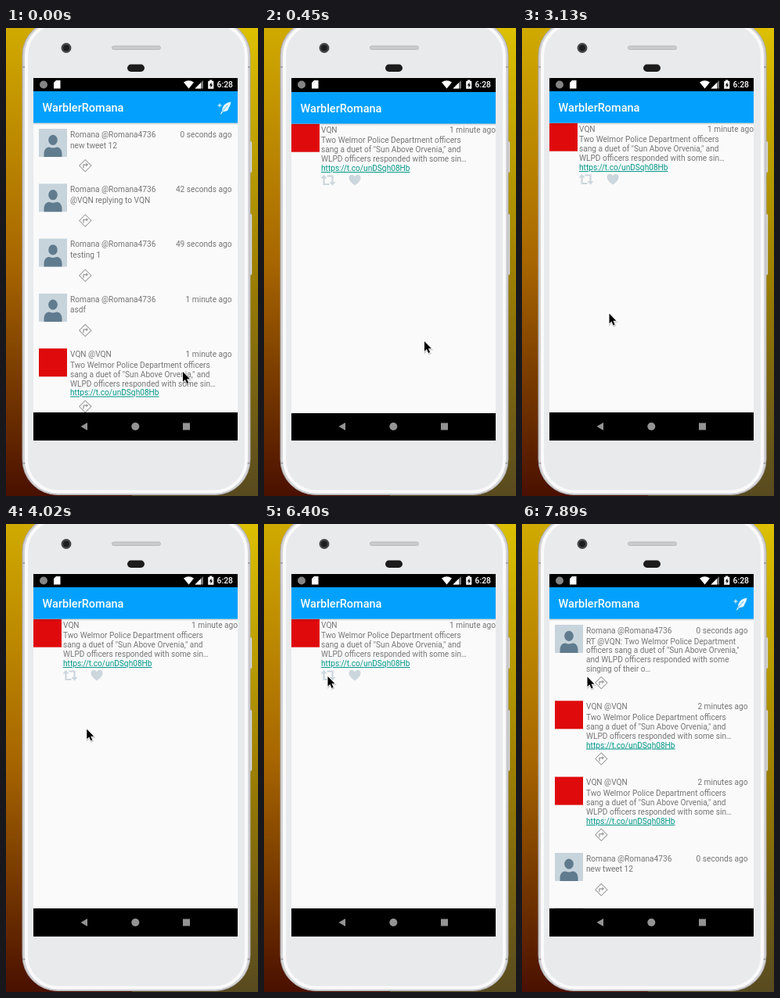
These frames come from a looping animation (322x599 px, 8000 ms). An HTML page:

```html
<!DOCTYPE html>
<html lang="en">
<head>
<meta charset="utf-8">
<title>Timeline demo</title>
<style>
  html, body { margin: 0; width: 100%; height: 100%; overflow: hidden; }
  body {
    background:
      linear-gradient(#dcc000, #a08200 50%, #584a20) right / 50% 100% no-repeat,
      linear-gradient(#d0aa00, #a86600 50%, #4a1000);
  }
  svg { display: block; width: 322px; height: 599px; }
  text { font: 10.15px Roboto, "Liberation Sans", sans-serif; fill: #757575; white-space: pre; }
  .title { font-size: 14.5px; font-weight: 500; fill: #fff; }
  .clock { font-size: 10.4px; font-weight: 500; fill: #fff; }
  .link { fill: #009688; text-decoration: underline; }
  .end { text-anchor: end; }
</style>
</head>
<body>
<svg viewBox="0 0 322 599">
  <defs>
    <clipPath id="screen"><rect x="35" y="64" width="261" height="464"/></clipPath>
    <linearGradient id="shade" x2="0" y2="1">
      <stop stop-opacity=".18"/>
      <stop offset="1" stop-opacity="0"/>
    </linearGradient>
    <g id="person">
      <rect width="36" height="36" fill="#c8d4dc"/>
      <ellipse cx="18" cy="14.3" rx="5.8" ry="6.6" fill="#607b8e"/>
      <path d="M6.5 36v-4c0-6 3.5-8.5 7-8.5q4.5 2 9 0c3.5 0 7 2.5 7 8.5v4z" fill="#607b8e"/>
    </g>
    <rect id="news" width="36" height="36" fill="#df0a0c"/>
    <g id="reply" fill="none" stroke="#9b9b9b" stroke-linejoin="round">
      <rect x="-5.4" y="-5.4" width="10.8" height="10.8" transform="rotate(45)"/>
      <path d="M-2.3 3V-1.2H1.5" stroke-width="1.3"/>
      <path d="M1-3.6 3.8-1.2 1 1.2z" fill="#9b9b9b" stroke="none"/>
    </g>
    <path id="arrow" d="M0 0V15L3.4 11.8 6 17.6 8.4 16.5 5.9 10.9H10.5z"/>
  </defs>

  <!-- phone body -->
  <g fill="#ececee" stroke="#b4b5b7" stroke-width=".6">
    <rect x="309" y="145" width="5" height="40" rx="1.5"/>
    <rect x="309" y="238" width="5" height="78" rx="1.5"/>
  </g>
  <rect x="21" y="-10" width="291" height="607.5" rx="45" fill="#d4d4d7" stroke="#aaa9ac"/>
  <path d="M21 50h5M307 50h5M21 557h5M307 557h5" stroke="#a4a4a7" stroke-width="2"/>
  <rect x="26" y="-6" width="281" height="599.5" rx="41" fill="#e9eaec" stroke="#fafafb" stroke-width="4"/>
  <circle cx="77" cy="25.5" r="6.5" fill="#47484a"/>
  <circle cx="77" cy="25.5" r="4" fill="#1d1e20"/>
  <rect x="135.5" y="23" width="62" height="4.5" rx="2.2" fill="#cbccce" stroke="#a9abad" stroke-width=".7"/>
  <rect x="155" y="46.5" width="22" height="9.5" rx="4.7" fill="#1c1c1d"/>

  <g clip-path="url(#screen)">
    <g id="before"></g>
    <g id="after"></g>
    <g id="detail"></g>
  </g>

  <!-- system icons -->
  <circle cx="48" cy="72.5" r="5" fill="#858585"/>
  <path d="M64 67h5.5v10.5h-8.5V70z" fill="#fff"/>
  <path d="M227 69.5q6.5-4.5 13 0L233.5 77.5z" fill="#fff"/>
  <path d="M252 67v10.5h-10.5z" fill="#777"/>
  <path d="M249 70v7.5h-7.5z" fill="#fff"/>
  <path d="M260 66.5h3.5V68h1.8v9.8h-7.1V68H260z" fill="#fff"/>
  <path d="M262.5 69.5 259.8 73.5h1.7v3l2.6-4h-1.6z"/>
  <text class="clock end" x="290" y="76">6:28</text>
  <g fill="#949494">
    <path d="M95.5 510 104 505v10z"/>
    <circle cx="165.3" cy="510" r="5"/>
    <rect x="226" y="505.5" width="9" height="9"/>
  </g>

  <g id="cursor">
    <g transform="scale(.85)">
      <use href="#arrow" x=".6" y="1.4" opacity=".2" stroke="#000" stroke-width="2"/>
      <use href="#arrow" stroke="#fff" stroke-width="1.6" paint-order="stroke"/>
    </g>
  </g>
</svg>

<script>
const LOOP = 8000, TICK = 150, LINE = 11.9;
const OPEN = 300, CLOSE = 6990, LIKE = 4910, UNLIKE = 5660;
const $ = id => document.getElementById(id);

const story = [
  'Two Welmor Police Department officers',
  'sang a duet of "Sun Above Orvenia," and',
  'WLPD officers responded with some sin…',
  'https://t.co/unDSqh08Hb'
];
const retweet = [
  'RT @VQN: Two Welmor Police Department',
  'officers sang a duet of "Sun Above Orvenia,"',
  'and WLPD officers responded with some',
  'singing of their o…'
];

const user = (ago, ...lines) => ({ pic: 'person', name: 'Romana @Romana4736', ago, lines });
const news = ago => ({ pic: 'news', name: 'VQN @VQN', ago, lines: story });

const text = (x, y, s, cls = '') => `<text x="${x}" y="${y}" class="${cls}">${s}</text>`;
const use = (id, x, y) => `<use href="#${id}" x="${x}" y="${y}"/>`;
const body = (x, y, lines) => lines.map((s, i) =>
  text(x, y + i * LINE, s, s.startsWith('http') ? 'link' : '')).join('');

// App window with its own bars, so that they slide along with it
const frame = content => `
  <rect x="35" y="64" width="261" height="500"/>
  <svg x="35" y="121" width="261" height="371" viewBox="35 121 261 371">
    <rect x="35" y="121" width="261" height="371" fill="#fafafa"/>
    ${content}
  </svg>
  <rect x="35" y="121" width="261" height="3.5" fill="url(#shade)"/>
  <rect x="35" y="81" width="261" height="40.5" fill="#03a1fd"/>
  ${text(46.5, 107, 'WarblerRomana', 'title')}`;

const feather = `
  <path d="M270.5 99h5M273 96.5v5" stroke="#fff"/>
  <path d="M287.5 94.5Q276.500 96 276 106L274 110l1 .4 2-3.2Q284 107 284.5 102.500 287 99 287.5 94.500z" fill="#fff" opacity=".9"/>
  <path d="M276 107 283 99" stroke="#03a1fd" stroke-width=".7"/>`;

function list(...items) {
  let top = 129, out = '';
  for (const { pic, name, ago, lines } of items) {
    const extra = lines.length > 1 ? 27 : 0;
    out += use(pic, 42, top) + text(82, top + 10.6, name) +
      text(288.5, top + 10.6, ago, 'end') + body(82, top + 24.5, lines) +
      use('reply', 101.3, top + 47.2 + extra);
    top += 70.3 + extra;
  }
  return frame(out) + feather;
}

const latest = user('0 seconds ago', 'new tweet 12');
const answer = user('42 seconds ago', '@VQN replying to VQN');

$('before').innerHTML = list(latest, answer,
  user('49 seconds ago', 'testing 1'), user('1 minute ago', 'asdf'), news('1 minute ago'));
$('after').innerHTML = list(user('0 seconds ago', ...retweet),
  news('2 minutes ago'), news('2 minutes ago'), latest, answer);
$('detail').innerHTML = frame(
  use('news', 35, 121.7) + text(73, 132.7, 'VQN') + text(296, 132.7, '1 minute ago', 'end') +
  body(73, 146.4, story) + `
  <g fill="#ccd6dd">
    <path d="M76.5 189.5v9.5h7M80.5 188.5h7v8.5" fill="none" stroke="#ccd6dd" stroke-width="2.2"/>
    <path d="M72.5 191.5l4-4.7 4 4.7zM83.5 196l4 4.7 4-4.7z"/>
  </g>
  <path id="heart" d="M116 200.5C111 197 108.5 194 108.5 190.7c0-4.6 5.7-5.4 7.5-1.4c1.8-4 7.5-3.2 7.5 1.4c0 3.3-2.5 6.3-7.5 9.8z"/>`);

// Pointer moves: where to, when, and how far the path bows sideways
const home = { x: 226, y: 440 };
const moves = [
  { from: 300, to: 450, x: 205, y: 401 },
  { from: 600, to: 600, x: 207, y: 174 },
  { from: 900, to: 1640, x: 181.5, y: 282.5 },
  { from: 1940, to: 2090, x: 141, y: 232 },
  { from: 2540, to: 2840, x: 121, y: 518 },
  { from: 2980, to: 3130, x: 111.5, y: 365.5 },
  { from: 3580, to: 4460, x: 113.5, y: 195.5, bow: -10 },
  { from: 5960, to: 6400, x: 81.5, y: 195 },
  { from: 7890, to: 7890, x: 83.5, y: 195.5 }
];

const ease = p => p * p * (3 - 2 * p);

function progress({ from, to }, t) {
  const ticks = Math.round((to - from) / TICK);
  const done = t >= to ? ticks : Math.floor((t - from) / (to - from) * ticks);
  return (done + 1) / (ticks + 1);
}

function pointer(t) {
  let { x, y } = home;
  for (const move of moves) {
    if (t < move.from) break;
    const p = ease(progress(move, t));
    x += (move.x - x) * p + (move.bow || 0) * Math.sin(Math.PI * p);
    y += (move.y - y) * p;
  }
  return [x, y];
}

// The detail window fades in while rising, then drops away in one tick
function slide(t) {
  if (t < OPEN || t >= CLOSE + TICK) return [0, 0];
  if (t >= CLOSE) return [7, .7];
  const tick = Math.floor((t - OPEN) / TICK);
  return [Math.round(22 ** (1 - tick)), tick ? 1 : .5];
}

const start = performance.now();

function draw() {
  const t = (performance.now() - start) % LOOP;
  const [dy, alpha] = slide(t);
  $('cursor').setAttribute('transform', `translate(${pointer(t)})`);
  $('detail').setAttribute('transform', `translate(0 ${dy})`);
  $('detail').setAttribute('opacity', alpha);
  $('heart').setAttribute('fill', t >= LIKE && t < UNLIKE ? '#f5085c' : '#ccd6dd');
  $('after').style.display = t < CLOSE ? 'none' : '';
  requestAnimationFrame(draw);
}
draw();
</script>
</body>
</html>
```
